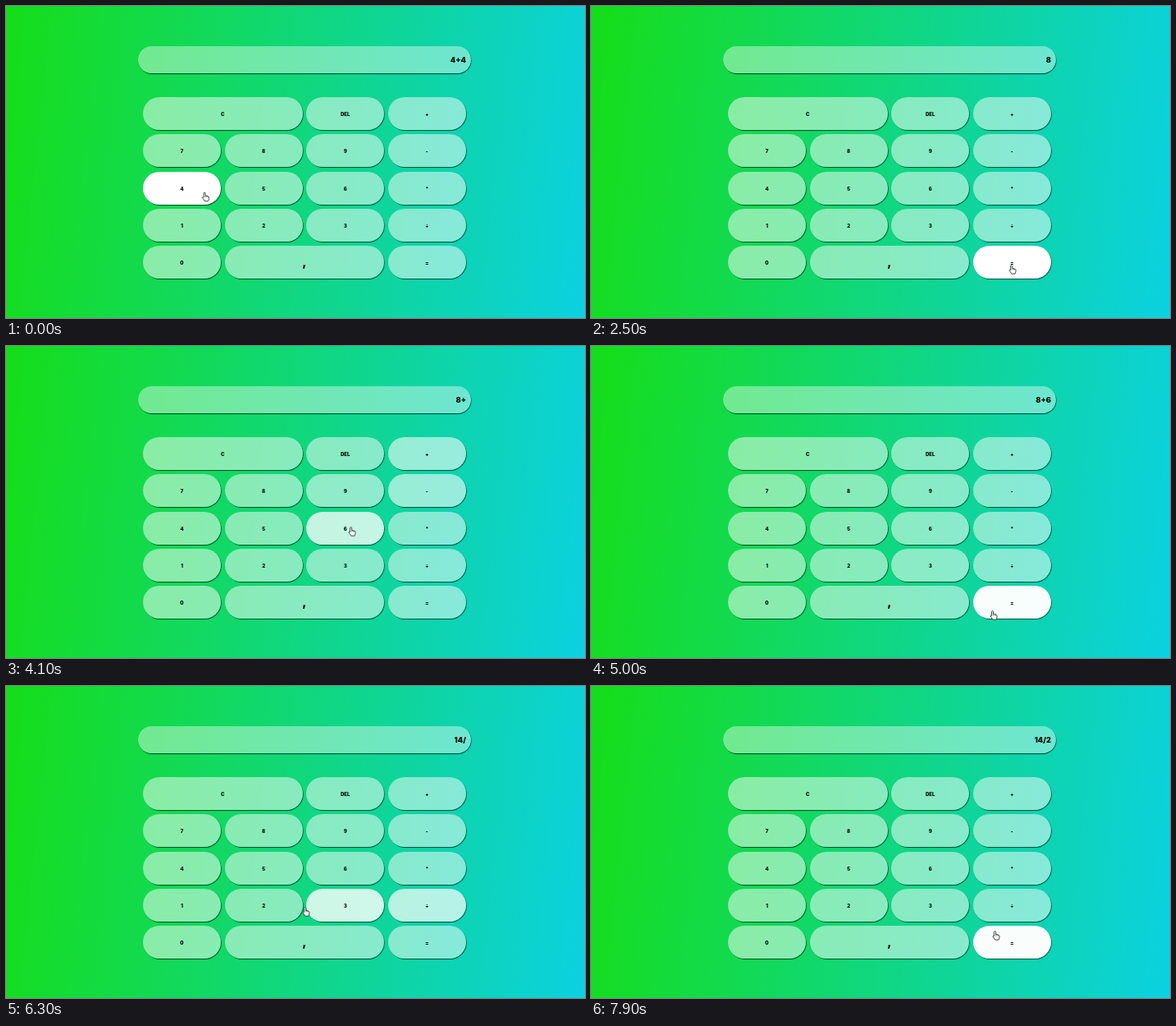
Recreate the animation shown at these times as an HTML page. Size 706 by 380 pixels, loop 8000 ms.

```html
<!DOCTYPE html>
<html lang="en">
<head>
<meta charset="utf-8">
<title>Calculator</title>
<style>
  html, body { margin: 0; width: 100%; height: 100%; overflow: hidden; }
  body {
    position: relative;
    background: linear-gradient(96deg, #15dd1e 3%, #0bd1e1 100%);
    font: 900 6px Inter, "Open Sans", sans-serif;
    color: #04150c;
  }
  .key, #screen { position: absolute; box-sizing: border-box; text-align: center; }
  .key {
    height: 40px;
    line-height: 41px;
    border-radius: 20px;
    background: rgba(255, 255, 255, .5);
    box-shadow: .7px .9px .8px rgba(0, 30, 18, .75);
  }
  .key.comma { font-size: 14px; line-height: 40px; }
  #screen {
    left: 161px; top: 49px; width: 406px; height: 33px;
    padding-right: 6px;
    border-radius: 16.5px;
    background: rgba(255, 255, 255, .4);
    box-shadow: .5px .9px .8px rgba(0, 30, 18, .8);
    font-size: 9.2px;
    line-height: 34px;
    text-align: right;
  }
  #hand { position: absolute; left: -6px; top: -7px; width: 12px; height: 14px; }
</style>
</head>
<body>
<div id="screen"></div>
<svg id="hand" viewBox="-6 -7 12 14">
  <path d="M-2.4-4.4a1 1 0 0 1 2 0V-1.5Q3.7-1.5 4 .5V2Q3.7 4 3 5.2H-1.2Q-2.7 2.6-4.2 .8Q-3.7-.5-2.4 .7Z"
        fill="#fff" stroke="#2b3532" stroke-width=".9" stroke-linejoin="round"/>
  <path d="M-.4-1.4V.6M1.2-1.2V.7M2.7-.9V.8" fill="none" stroke="#2b3532" stroke-width=".5"/>
</svg>
<script>
const LOOP = 8000, STEP = 100, TICK = 10;
const FADE = 110, LAG = 60; // hover fade constant and delay, ms
const WIDTH = 95, HEIGHT = 40, PITCH_X = 99.6, PITCH_Y = 45.15;
const screenBox = document.getElementById("screen");
const hand = document.getElementById("hand");

// Doubled names span two columns
const layout = ["C C DEL +", "7 8 9 -", "4 5 6 *", "1 2 3 ÷", "0 , , ="];

// The pointer sets off, arrives at x, y, then presses and the screen reads text
const moves = [
  { from: 0, to: 0, x: 243.5, y: 232.5, press: 0, text: "4+4" },
  { from: 1200, to: 1370, x: 514, y: 321, press: 2200, text: "8" },
  { from: 2700, to: 3080, x: 518.5, y: 146, press: 3500, text: "8+" },
  { from: 3750, to: 4050, x: 422, y: 226, press: 4300, text: "8+6" },
  { from: 4450, to: 4750, x: 491, y: 328, press: 5300, text: "14" },
  { from: 5350, to: 5600, x: 510, y: 275, press: 5900, text: "14/" },
  { from: 5990, to: 6450, x: 318, y: 275, press: 6700, text: "14/2" },
  { from: 7200, to: 7600, x: 494, y: 304, press: LOOP }
];

const keys = [];
layout.forEach((line, r) => line.split(" ").forEach((label, c) => {
  const last = keys[keys.length - 1];
  if (last && last.label === label) {
    last.w += PITCH_X;
    last.el.style.width = last.w + "px";
    return;
  }
  const key = {
    label, x: 167 + c * PITCH_X, y: 111.2 + r * PITCH_Y, w: WIDTH,
    el: document.createElement("div"), glow: []
  };
  key.el.className = label === "," ? "key comma" : "key";
  key.el.textContent = label;
  key.el.style.cssText = `left:${key.x}px;top:${key.y}px;width:${key.w}px`;
  document.body.insertBefore(key.el, hand);
  keys.push(key);
}));

const smooth = p => p * p * (3 - 2 * p);

function pointer(t) {
  let { x, y } = moves[0];
  for (const m of moves.slice(1)) {
    if (t <= m.from) break;
    const p = smooth(Math.min(1, (t - m.from) / (m.to - m.from)));
    x += (m.x - x) * p;
    y += (m.y - y) * p;
  }
  return [x, y];
}

// The fingertip sits up and left of the hand's middle
function isOver(key, [x, y]) {
  const dx = x - 1.5 - key.x, dy = y - 5 - key.y;
  return dx >= 0 && dx <= key.w && dy >= 0 && dy <= HEIGHT;
}

// Follow the pointer once through the loop and note each key's glow
for (const key of keys) {
  let level = isOver(key, pointer(0)) ? 1 : 0;
  for (let t = 0; t < LOOP; t += TICK) {
    if (t % STEP === 0) key.glow.push(level);
    const goal = isOver(key, pointer(t - LAG)) ? 1 : 0;
    level += (goal - level) * (1 - Math.exp(-TICK / FADE));
  }
}

function draw(t) {
  for (const { el, glow } of keys) {
    el.style.backgroundColor = `rgba(255,255,255,${0.5 + 0.5 * glow[t / STEP]})`;
  }
  screenBox.textContent = moves.filter(m => m.press <= t).pop().text;
  const [x, y] = pointer(t);
  hand.style.transform = `translate(${x}px, ${y}px)`;
}

const start = performance.now();
function tick(now) {
  const t = Math.max(0, now - start) % LOOP;
  draw(Math.floor(t / STEP) * STEP);
  requestAnimationFrame(tick);
}
draw(0);
requestAnimationFrame(tick);
</script>
</body>
</html>
```
